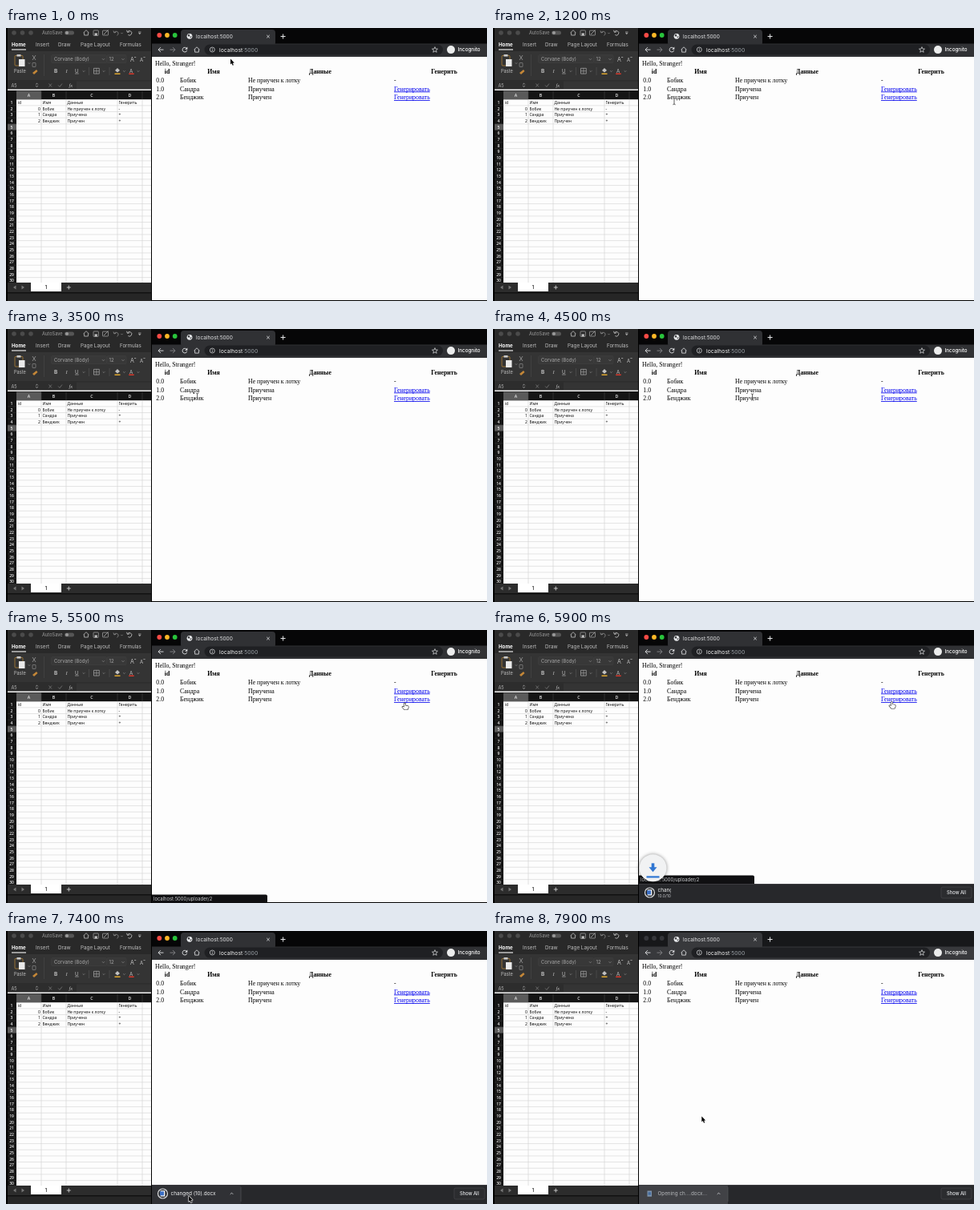
Recreate the animation shown at these times as an HTML page with a canvas. Size 600x341 px, loop 8 s.

```html
<!DOCTYPE html>
<html lang="ru">
<head>
<meta charset="utf-8">
<title>Table and download</title>
<style>
html, body { margin: 0; width: 600px; height: 341px; overflow: hidden; background: #000; }
canvas { display: block; width: 600px; height: 341px; }
</style>
</head>
<body>
<canvas id="stage"></canvas>
<script>
const W = 600, H = 341, LOOP = 8000, STEP = 100;
const UI = 'Inter, Roboto, sans-serif';
const CELL = '"Open Sans", "Noto Sans", sans-serif';
const PAGE = '"Liberation Serif", "Noto Serif", serif';
const cv = document.getElementById('stage');
const dpr = window.devicePixelRatio || 1;
cv.width = W * dpr;
cv.height = H * dpr;
const g = cv.getContext('2d');

const clamp = v => Math.max(0, Math.min(1, v));
const span = (t, a, b) => clamp((t - a) / (b - a));
const ease = p => p * p * (3 - 2 * p);
const mix = (a, b, p) => a + (b - a) * p;

function rect(x, y, w, h, fill) {
  g.fillStyle = fill;
  g.fillRect(x, y, w, h);
}
function round(x, y, w, h, r, fill, stroke) {
  g.beginPath();
  g.roundRect(x, y, w, h, r);
  if (fill) { g.fillStyle = fill; g.fill(); }
  if (stroke) { g.strokeStyle = stroke; g.lineWidth = 0.6; g.stroke(); }
}
function dot(x, y, r, fill) {
  g.beginPath();
  g.arc(x, y, r, 0, 7);
  g.fillStyle = fill;
  g.fill();
}
function ring(x, y, r, color, w = 0.8, a = 0, b = Math.PI * 2) {
  g.beginPath();
  g.arc(x, y, r, a, b);
  g.strokeStyle = color;
  g.lineWidth = w;
  g.stroke();
}
function line(color, w, ...pts) {
  g.beginPath();
  for (let i = 0; i < pts.length; i += 2) g.lineTo(pts[i], pts[i + 1]);
  g.strokeStyle = color;
  g.lineWidth = w;
  g.stroke();
}
function shape(fill, ...pts) {
  g.beginPath();
  for (let i = 0; i < pts.length; i += 2) g.lineTo(pts[i], pts[i + 1]);
  g.closePath();
  g.fillStyle = fill;
  g.fill();
}
function text(s, x, y, size, color, font = UI, align = 'left', weight = 400) {
  g.font = `${weight} ${size}px ${font}`;
  g.textAlign = align;
  g.fillStyle = color;
  g.fillText(s, x, y);
}
const chevron = (x, y, c, s = 1.6, up = 1) =>
  line(c, 0.8, x - s, y - s / 2 * up, x, y + s / 2 * up, x + s, y - s / 2 * up);

const rows = [
  ['Бобик', 'Не приучен к лотку', '-'],
  ['Сандра', 'Приучена', '+'],
  ['Бенджик', 'Приучен', '+']
];

function houseIcon(x, y, c) {
  line(c, 0.8, x - 3.5, y, x, y - 3.3, x + 3.5, y);
  line(c, 0.8, x - 2.4, y - 0.6, x - 2.4, y + 3, x + 2.4, y + 3, x + 2.4, y - 0.6);
}

function ribbon() {
  const c = '#c0c0c0', dim = '#858585';
  rect(2, 0, 179, 29, '#292929');
  rect(2, 29, 179, 36, '#343434');
  for (const x of [10, 20.5, 31]) dot(x, 6, 2.8, '#4b4b4b');
  text('AutoSave', 45, 8.2, 5.6, '#8f8f8f', UI, 'left', 500);
  round(73, 3.5, 12, 5, 2.5, '#555');
  dot(76, 6, 2, '#9b9b9b');
  houseIcon(100, 6, c);
  round(109, 3, 6.4, 6.4, 0.8, null, c);
  rect(110.6, 6.4, 3.2, 3, c);
  round(120.5, 3.2, 7, 5.8, 0.6, null, c);
  line(c, 0.7, 122, 8, 127.5, 2.5);
  ring(137.5, 6.8, 2.6, dim, 0.9, -2.8, 1.2);
  line(dim, 0.9, 134, 3.4, 134.8, 5.9, 137.2, 5.4);
  chevron(144.5, 6.5, dim, 1.2);
  ring(154, 6.3, 2.8, c, 0.9, -2.6, 2.2);
  line(c, 0.9, 150.5, 2.8, 151.5, 5.3, 154, 4.8);
  line(c, 0.7, 165, 5, 168.5, 5);
  shape(c, 165, 6.3, 168.5, 6.3, 166.7, 8);

  text('Home', 7, 23.4, 6.2, '#fff', UI, 'left', 700);
  text('Insert', 37, 23.4, 6.3, c);
  text('Draw', 65, 23.4, 6.3, c);
  text('Page Layout', 93, 23.4, 6.3, c);
  text('Formulas', 142, 23.4, 6.2, c);
  rect(7, 26.4, 18, 1.2, '#e8e8e8');

  round(11, 34.5, 10, 12.5, 1, null, '#d99a36');
  rect(13.5, 33, 5, 2.6, '#c9c9c9');
  rect(16, 39, 7.5, 9, '#e9e9e9');
  text('Paste', 10, 56, 5.6, c);
  chevron(29, 44, dim, 1.2);
  line('#9a9a9a', 0.8, 33, 34, 37, 40);
  line('#9a9a9a', 0.8, 37, 34, 33, 40);
  round(33, 43.5, 4, 5, 0.5, null, '#9a9a9a');
  shape('#c48738', 33, 56, 38, 52, 39.5, 54, 35, 58);
  line('#4b4b4b', 0.6, 47.5, 33, 47.5, 60);
  round(56.5, 33.8, 69, 9.8, 1, '#383838', '#424242');
  text('Corvane (Body)', 60, 41, 5.9, '#a8a8a8');
  chevron(121.5, 39, dim, 1.5);
  round(126, 33.8, 24, 9.8, 1, '#383838', '#424242');
  text('12', 128.5, 41, 6, '#a8a8a8');
  chevron(146, 39, dim, 1.5);
  text('A', 155, 41.5, 7, c);
  chevron(161.2, 36.5, c, 1, -1);
  text('A', 167, 41.5, 6, c);
  chevron(172.5, 36.5, c, 1);
  text('B', 60, 56, 6.5, c, UI, 'left', 700);
  text('I', 74.5, 56, 6.5, c, PAGE, 'left', 'italic');
  text('U', 86, 55.5, 6.2, c);
  line(c, 0.6, 86, 57, 90.8, 57);
  chevron(97, 54, dim, 1.3);
  line('#555', 0.6, 103.5, 49, 103.5, 59);
  round(109.5, 50.3, 6.8, 6.8, 0, null, c);
  line(c, 0.5, 112.9, 50.3, 112.9, 57.1);
  line(c, 0.5, 109.5, 53.7, 116.3, 53.7);
  chevron(122, 54, dim, 1.3);
  line('#555', 0.6, 129, 49, 129, 59);
  shape(c, 136, 53, 139, 50, 142, 53, 139, 55.5);
  rect(135.5, 56.5, 7, 1.5, '#e0a82e');
  chevron(147.5, 54, dim, 1.3);
  text('A', 154, 55.5, 6.2, c);
  rect(153.2, 56.5, 6.5, 1.5, '#d9382b');
  chevron(165, 54, dim, 1.3);

  rect(2, 65, 179, 12, '#2d2d2d');
  text('A5', 6.5, 73.6, 5.6, '#b8b8b8');
  chevron(38.5, 69.8, c, 1.3, -1);
  chevron(38.5, 72.8, c, 1.3);
  line('#777', 0.8, 53.5, 69.5, 57, 73.5);
  line('#777', 0.8, 57, 69.5, 53.5, 73.5);
  line('#777', 0.8, 65.2, 71.5, 67, 73.5, 70, 69.5);
  text('fx', 78.5, 73.8, 6.5, c, PAGE, 'left', 'italic');
  rect(88, 66.5, 93, 10, '#343434');
}

function sheet() {
  const top = 89.2, pitch = 7.67, right = 181, edges = [13, 44, 75, 139, 170];
  rect(2, 78, right - 2, 240, '#151515');
  rect(2, 76.5, right - 2, 1.5, '#f4f4f4');
  rect(13, top, right - 13, 318 - top, '#fdfdfd');
  rect(13, 78.5, 31, 10.7, '#5a5a5a');
  rect(2, top + 4 * pitch, 11, pitch, '#5a5a5a');
  'ABCD'.split('').forEach((s, i) => {
    text(s, (edges[i] + edges[i + 1]) / 2, 85.5, 5.2, '#eee', CELL, 'center', 600);
    line('#444', 0.6, edges[i + 1], 79, edges[i + 1], top);
  });
  for (let i = 0; i < 30; i++) {
    const y = top + i * pitch;
    line('#d2d2d2', 0.6, 13, y + pitch, right, y + pitch);
    line('#3a3a3a', 0.5, 2, y + pitch, 13, y + pitch);
    text(i + 1, 7, y + 5.7, 5, '#f2f2f2', CELL, 'center', 600);
  }
  for (const x of edges.slice(1)) line('#d2d2d2', 0.6, x, top, x, 318);
  const put = (s, x, r, align) => text(s, x, top + r * pitch + 5.7, 5.05, '#000', CELL, align, 500);
  ['id', 'Имя', 'Данные', 'Генерить'].forEach((s, i) => put(s, edges[i] + 1.6, 0));
  rows.forEach((row, r) => {
    put(r, 43, r + 1, 'right');
    row.forEach((s, i) => put(s, edges[i + 1] + 1.4, r + 1));
  });

  rect(2, 318, 179, 12, '#2c2c2c');
  shape('#777', 12.5, 321.5, 12.5, 326.5, 9, 324);
  shape('#777', 19.5, 321.5, 19.5, 326.5, 23, 324);
  rect(31, 318, 38, 11, '#fff');
  text('1', 50, 326, 5.5, '#222', UI, 'center', 600);
  line('#ccc', 0.9, 75.8, 324, 80.8, 324);
  line('#ccc', 0.9, 78.3, 321.5, 78.3, 326.5);
  rect(2, 330, 179, 11, '#262626');
  rect(2, 330, 179, 1.5, '#111');
}

function globe(x, y, bg) {
  dot(x, y, 3.4, '#e6e8ea');
  shape(bg, x - 2.6, y - 1.5, x - 0.4, y - 2.6, x + 0.3, y - 0.6, x - 1, y + 0.6);
  shape(bg, x + 0.4, y + 0.6, x + 2.6, y - 0.4, x + 1.5, y + 2.2);
}

function chrome(active) {
  const bar = active ? '#303134' : '#38393c', c = '#e4e5e7';
  rect(182, 0, 418, 20, active ? '#060607' : '#17181a');
  rect(182, 19.5, 418, 16.5, bar);
  round(218, 2, 118, 20, 4, bar);
  const lights = active ? ['#fb4b46', '#fdb827', '#29c43c'] : ['#35363a', '#35363a', '#35363a'];
  lights.forEach((k, i) => dot(191.3 + i * 9.7, 9, 2.9, k));
  globe(229, 10.3, bar);
  text('localhost:5000', 237, 12.8, 6.5, c);
  line(c, 0.8, 325.2, 8.8, 328.8, 12.4);
  line(c, 0.8, 328.8, 8.8, 325.2, 12.4);
  line(c, 1, 342.6, 10.5, 348.6, 10.5);
  line(c, 1, 345.6, 7.5, 345.6, 13.5);

  g.save();
  g.translate(0, -0.4);
  line(c, 0.9, 196.5, 27.5, 190, 27.5);
  line(c, 0.9, 193, 24.5, 190, 27.5, 193, 30.5);
  line('#85868a', 0.9, 204.5, 27.5, 211, 27.5);
  line('#85868a', 0.9, 208, 24.5, 211, 27.5, 208, 30.5);
  ring(223, 27.5, 2.9, c, 0.9, 0.3, 5.4);
  shape(c, 226.3, 24, 226.3, 27.2, 223.2, 27.2);
  houseIcon(238, 27.5, c);
  round(247.5, 21, 297.5, 13, 6.5, '#1f2023');
  ring(257.3, 27.4, 3, c, 0.7);
  line(c, 0.8, 257.3, 27, 257.3, 29.2);
  rect(256.9, 25.5, 0.8, 0.8, c);
  text('localhost', 266, 29.9, 6.85, '#f1f1f1');
  const w = g.measureText('localhost').width;
  text(':5000', 266 + w, 29.9, 6.85, '#9aa0a6');
  g.beginPath();
  for (let i = 0; i < 10; i++) {
    const a = i * Math.PI / 5 - Math.PI / 2, r = i % 2 ? 1.6 : 3.7;
    g.lineTo(535 + r * Math.cos(a), 27.7 + r * Math.sin(a));
  }
  g.closePath();
  g.strokeStyle = c;
  g.lineWidth = 0.7;
  g.stroke();
  dot(555, 27.5, 5, '#eceded');
  text('Incognito', 563.5, 29.8, 6.3, '#fff', UI, 'left', 500);
  g.restore();
}

function page() {
  const put = (s, x, y, align, weight, color = '#000') => text(s, x, y, 7.82, color, PAGE, align, weight);
  rect(182, 36, 418, 304, '#fdfdfd');
  put('Hello, Stranger!', 186, 47.3);
  [['id', 201], ['Имя', 259], ['Данные', 392], ['Генерить', 546.5]]
    .forEach(([s, x]) => put(s, x, 57.4, 'center', 700));
  rows.forEach((row, i) => {
    const y = 68 + i * 10.67;
    put(i + '.0', 187.3, y);
    put(row[0], 217, y);
    put(row[1], 302, y);
    if (i) {
      put('Генерировать', 484, y, 'left', 400, '#0000ee');
      rect(484, y + 0.8, g.measureText('Генерировать').width, 0.8, '#0000ee');
    } else put('-', 484, y);
  });
}

function shelf(t, opening) {
  const top = mix(H, 317, ease(span(t, 5550, 5800)));
  if (t >= 5500 && t < 6700) {
    g.globalAlpha = 1 - span(t, 6400, 6700);
    round(182, top - 10.5, 144, 10.5, [0, 2, 0, 0], '#101012');
    text('localhost:5000/uploader/2', 184, top - 3, 5.85, '#d0d2d5');
    g.globalAlpha = 1;
  }
  if (t < 5600) return;
  g.save();
  g.translate(0, top - 317);
  rect(182, 317, 418, 24, '#27282b');
  rect(182, 317, 418, 0.7, '#45464a');
  round(559, 321, 38, 14, 2, '#2b2c2f', '#4a4b4f');
  text('Show All', 578, 330.2, 5.8, '#e8eaed', UI, 'center', 500);

  const open = span(t, 5750, 6150), done = open === 1;
  const edge = t < 6700 ? mix(190, 277, open) : 293;
  if (t >= 7100) rect(182, 317.7, 111, 23.3, opening ? '#414246' : '#303135');
  if (opening) {
    rect(192.5, 324.5, 5.5, 7.2, '#7d93ad');
    rect(193.5, 326.2, 3.5, 3.5, '#466d9e');
    text('Opening ch....docx...', 205.5, 330.3, 6.3, '#b5b7ba');
  } else {
    ring(195.5, 328, 6, '#d9dbde', 1.2);
    rect(192.7, 324.2, 5.6, 7.4, '#f2f4f7');
    rect(192, 325.3, 5, 5, '#3b6fc4');
    g.save();
    g.beginPath();
    g.rect(182, 317, done ? 111 : mix(25, 65, open), 24);
    g.clip();
    text('changed (10).docx', 205.5, done ? 330.3 : 327.3, 6.4, '#f2f3f4');
    if (!done) text('10.0/10.0 KB', 205.5, 333.8, 5, '#c5c7ca');
    g.restore();
  }
  if (done) {
    chevron(edge - 11.5, 328, '#d4d6d9', 1.8, -1);
    line('#55565a', 0.7, edge, 320, edge, 338);
  }
  g.restore();
}

function dropBadge(t) {
  if (t < 5700 || t >= 6500) return;
  const x = 199.5, y = mix(287, 318, span(t, 5700, 6300));
  g.save();
  g.globalAlpha = span(t, 5650, 5850) * (1 - 0.7 * span(t, 5950, 6300)) * (1 - span(t, 6300, 6500));
  g.shadowColor = 'rgba(0,0,0,.45)';
  g.shadowBlur = 4 * dpr;
  dot(x, y, 17, '#f1f2f3');
  g.shadowColor = 'transparent';
  const b = '#2f76d2';
  rect(x - 1.8, y - 6, 3.6, 6, b);
  shape(b, x - 5, y - 1, x + 5, y - 1, x, y + 5);
  rect(x - 8, y + 10, 16, 2.2, b);
  g.restore();
}

// A page icon hops up from below the bottom edge.
function hop(t) {
  if (t < 6150 || t > 6650) return;
  const y = H - 9 * Math.sin(Math.PI * span(t, 6150, 6650));
  shape('#f4f4f4', 426, y, 433, y, 437, y + 4, 437, y + 14, 426, y + 14);
  shape('#c8c8c8', 433, y, 437, y + 4, 433, y + 4);
}

// time, x, y of the pointer tip
const path = [
  [0, 280, 38.5], [400, 215, 72], [900, 226, 98], [1500, 226, 80], [2100, 225, 58],
  [2500, 245, 74], [3000, 236, 78], [3700, 241, 87], [4100, 280, 92], [4500, 323.5, 85],
  [5000, 430, 95], [5400, 496.8, 92], [5900, 496.8, 90], [6300, 327.5, 153.5],
  [7100, 228, 331], [7500, 228, 331], [7900, 260.3, 231.5], [8000, 260.3, 231.5]
];
const slope = (i, k) => (path[i + 1][k] - path[i][k]) / (path[i + 1][0] - path[i][0]);
// Speed at a point: zero at turns and rests, otherwise between both neighbours.
function speed(i, k) {
  if (i === 0 || i === path.length - 1) return 0;
  const a = slope(i - 1, k), b = slope(i, k);
  return a * b > 0 ? 2 * a * b / (a + b) : 0;
}
function pointer(t) {
  const j = Math.max(1, path.findIndex(p => p[0] > t)), i = j - 1;
  const d = path[j][0] - path[i][0], p = (t - path[i][0]) / d, q = 1 - p;
  return [1, 2].map(k => mix(path[i][k], path[j][k], ease(p)) +
    d * p * q * (q * speed(i, k) - p * speed(j, k)));
}
function outlined(pts, fill, edge) {
  g.beginPath();
  for (let i = 0; i < pts.length; i += 2) g.lineTo(pts[i], pts[i + 1]);
  g.closePath();
  g.lineJoin = 'round';
  g.lineWidth = 1.2;
  g.strokeStyle = edge;
  g.stroke();
  g.fillStyle = fill;
  g.fill();
}
function cursor(t) {
  const [x, y] = pointer(t);
  const inRows = y > 61 && y < 91.5;
  g.save();
  g.translate(x, y);
  if (inRows && y > 71 && x > 484 && x < 528) {
    outlined([0, 0, 1.3, 0, 1.5, 3, 4.8, 3.6, 5.2, 5, 4, 8, 0.2, 8, -2.6, 4.7, -1.8, 4, -0.2, 5], '#fff', '#222');
  } else if (inRows && ((x > 217 && x < 242) || (x > 302 && x < 331))) {
    for (const [c, w] of [['#fff', 1.6], ['#333', 0.8]]) {
      line(c, w, 0, -3.5, 0, 3.5);
      line(c, w, -1.6, -4.3, 0, -3.5, 1.6, -4.3);
      line(c, w, -1.6, 4.3, 0, 3.5, 1.6, 4.3);
    }
  } else {
    outlined([0, 0, 0, 7, 1.5, 5.6, 2.7, 8.3, 3.9, 7.8, 2.8, 5.2, 4.8, 5], '#000', '#fff');
  }
  g.restore();
}

function draw(t) {
  g.setTransform(dpr, 0, 0, dpr, 0, 0);
  g.lineJoin = 'miter';
  rect(0, 0, W, H, '#000');
  ribbon();
  sheet();
  chrome(t < 7700);
  page();
  shelf(t, t >= 7600);
  dropBadge(t);
  hop(t);
  cursor(t);
}

const start = performance.now();
function tick(now) {
  const t = Math.max(0, now - start) % LOOP;
  draw(Math.floor(t / STEP) * STEP);
  requestAnimationFrame(tick);
}
draw(0);
requestAnimationFrame(tick);
</script>
</body>
</html>
```
